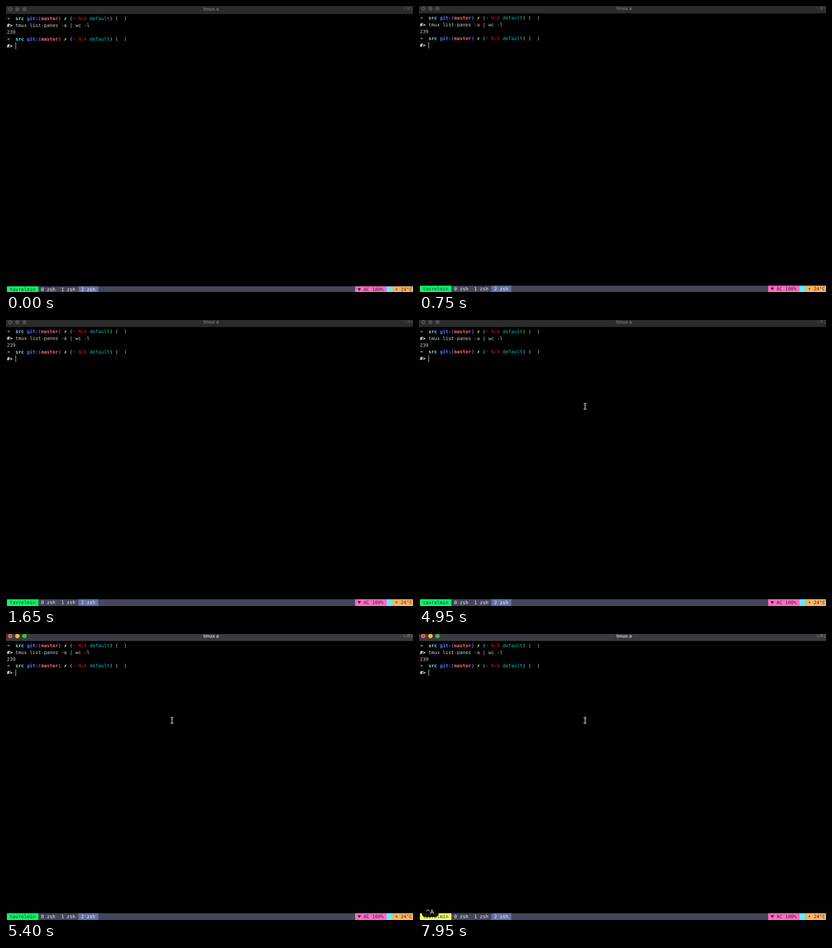
Recreate the animation shown at these times as an HTML page. Size 893 px wide and 627 px high, loop 8000 ms.

```html
<!DOCTYPE html>
<html lang="en">
<head>
<meta charset="utf-8">
<title>Terminal</title>
<style>
  html, body { margin: 0; width: 100%; height: 100%; overflow: hidden; background: #000; }
  svg { display: block; width: 893px; height: 627px; }
  text {
    font: 10.4px "DejaVu Sans Mono", "DejaVu Sans", monospace;
    fill: #d2d2d2; white-space: pre; text-rendering: geometricPrecision;
  }
  .b { font-weight: bold; }
  .white { fill: #fff; }
  .green { fill: #5ffa68; }
  .cyan { fill: #60fdff; }
  .blue { fill: #6871ff; }
  .red { fill: #ff6d67; }
  .yellow { fill: #fefb67; }
  .dim-red { fill: #c91b00; }
  .dim-cyan { fill: #00c5c7; }
  .dark { fill: #282a36; }
  .light { fill: #f8f8f2; }
  .title { font: bold 10.3px Inter, sans-serif; text-anchor: middle; }
  .hint { font: 8.6px "DejaVu Sans", sans-serif; }
  .keys { font: 12px "DejaVu Sans", sans-serif; fill: #fff; }

  .anim, .focus { animation: 8s step-end infinite; }
  .window { animation-name: settle; }
  .bar { animation-name: bar; }
  .title { animation-name: title; }
  .hint { animation-name: hint; }
  .close { --on: #ff5f57; }
  .min { --on: #febc2e; }
  .zoom { --on: #28c840; }
  .focus { animation-name: light; }
  .arrow { animation-name: arrow; }
  .beam { animation-name: beam; }
  .session { animation-name: prefix; }
  .overlay { animation-name: overlay; }

  @keyframes settle {
    0% { transform: translateY(2.4px); }
    7.5% { transform: translateY(1.6px); }
    9.375% { transform: translateY(1px); }
    20.625%, 100% { transform: none; }
  }
  @keyframes bar { 0% { fill: #2b2b2c; } 67.5%, 100% { fill: #3c3a3f; } }
  @keyframes title { 0% { fill: #717171; } 67.5%, 100% { fill: #c4c4c4; } }
  @keyframes hint { 0% { fill: #606060; } 67.5%, 100% { fill: #858585; } }
  @keyframes light { 0% { fill: #4e4e4f; } 67.5%, 100% { fill: var(--on); } }
  @keyframes arrow {
    0% { visibility: hidden; }
    58.125% { visibility: visible; }
    60%, 100% { visibility: hidden; }
  }
  @keyframes beam {
    0% { visibility: hidden; transform: translate(370px, 140px); }
    60% { visibility: visible; transform: translate(370px, 140px); }
    61.875%, 100% { visibility: visible; transform: translate(364.3px, 189.3px); }
  }
  @keyframes prefix { 0% { fill: #05fa66; } 99.375%, 100% { fill: #f1fa65; } }
  @keyframes overlay { 0% { visibility: hidden; } 99.375%, 100% { visibility: visible; } }
</style>
</head>
<body>
<svg viewBox="0 0 893 627">
  <defs>
    <g id="prompt">
      <text><tspan class="b green" x="2">➜</tspan><tspan class="b cyan" x="20.8">src</tspan><tspan class="b blue" x="45.8">git:(</tspan><tspan class="b red" x="77.1">master</tspan><tspan class="b blue" x="114.7">)</tspan><tspan class="b yellow" x="127.2">✗</tspan><tspan x="139.7">(</tspan><tspan class="dim-red" x="158.5">N/A</tspan><tspan class="dim-cyan" x="183.5">default</tspan><tspan x="227.4">)</tspan><tspan x="239.9">(</tspan><tspan x="258.7">)</tspan></text>
      <circle cx="149.8" cy="-3.8" r="1.9" fill="#0a1fae"/>
    </g>
    <path id="beam-shape" d="M-3-6.2Q0-6.2 0-4Q0-6.2 3-6.2M0-4V4M-3 6.2Q0 6.2 0 4Q0 6.2 3 6.2M-1.5 1H1.5" fill="none"/>
  </defs>

  <g class="window anim">
    <rect class="bar anim" y="-12" width="893" height="27.3"/>
    <circle class="close focus" cx="9.3" cy="4.7" r="4.8"/>
    <circle cx="9.3" cy="4.7" r="1.5" fill="#000" opacity=".5"/>
    <circle class="min focus" cx="25" cy="4.7" r="4.8"/>
    <circle class="zoom focus" cx="40.6" cy="4.7" r="4.8"/>
    <text class="title anim" x="450" y="8">tmux a</text>
    <text class="hint anim" x="869" y="7">⌥⌘1</text>

    <use href="#prompt" y="28.9"/>
    <text x="2" y="43.7"><tspan class="b white">#&gt;</tspan> tmux list-panes -a | wc -l</text>
    <text x="2" y="58.5">239</text>
    <use href="#prompt" y="73.4"/>
    <text class="b white" x="2" y="88.2">#&gt;</text>
    <rect x="21" y="77.6" width="1" height="14.6" fill="#e0e0e0"/>

    <g>
      <rect x="71" y="612.2" width="822" height="18" fill="#44475a"/>
      <rect class="session anim" x="2" y="612.2" width="69" height="18"/>
      <rect x="158.8" y="612.2" width="43.8" height="18" fill="#6272a4"/>
      <rect x="766" y="612.2" width="69" height="18" fill="#ff6ac6"/>
      <rect x="835" y="612.2" width="12.8" height="18" fill="#62eaff"/>
      <rect x="847.8" y="612.2" width="46" height="18" fill="#ffb45c"/>
      <text class="dark" x="8.3" y="623">tavrelmin</text>
      <text class="light" x="77.1" y="623">0 zsh</text>
      <text class="light" x="121" y="623">1 zsh</text>
      <text class="light" x="164.8" y="623">2 zsh</text>
      <text class="dark" y="623"><tspan x="772">♥</tspan><tspan x="784.5">AC 100%</tspan><tspan x="853.4">☀</tspan><tspan x="865.9">24°C</tspan></text>
    </g>
  </g>

  <path class="arrow anim" d="M377 14.3V25.6L379.6 23.2L381.4 27.4L383.4 26.5L381.6 22.4H385Z" fill="#000" stroke="#fff" stroke-width="1"/>
  <g class="beam anim">
    <use href="#beam-shape" stroke="#fff" stroke-width="2.8"/>
    <use href="#beam-shape" stroke="#000" stroke-width="1"/>
  </g>
  <g class="overlay anim">
    <rect x="6" y="598" width="37" height="22.5" rx="8" fill="#000" opacity=".9"/>
    <text class="keys" x="14.5" y="613">^A</text>
  </g>
</svg>
</body>
</html>
```
